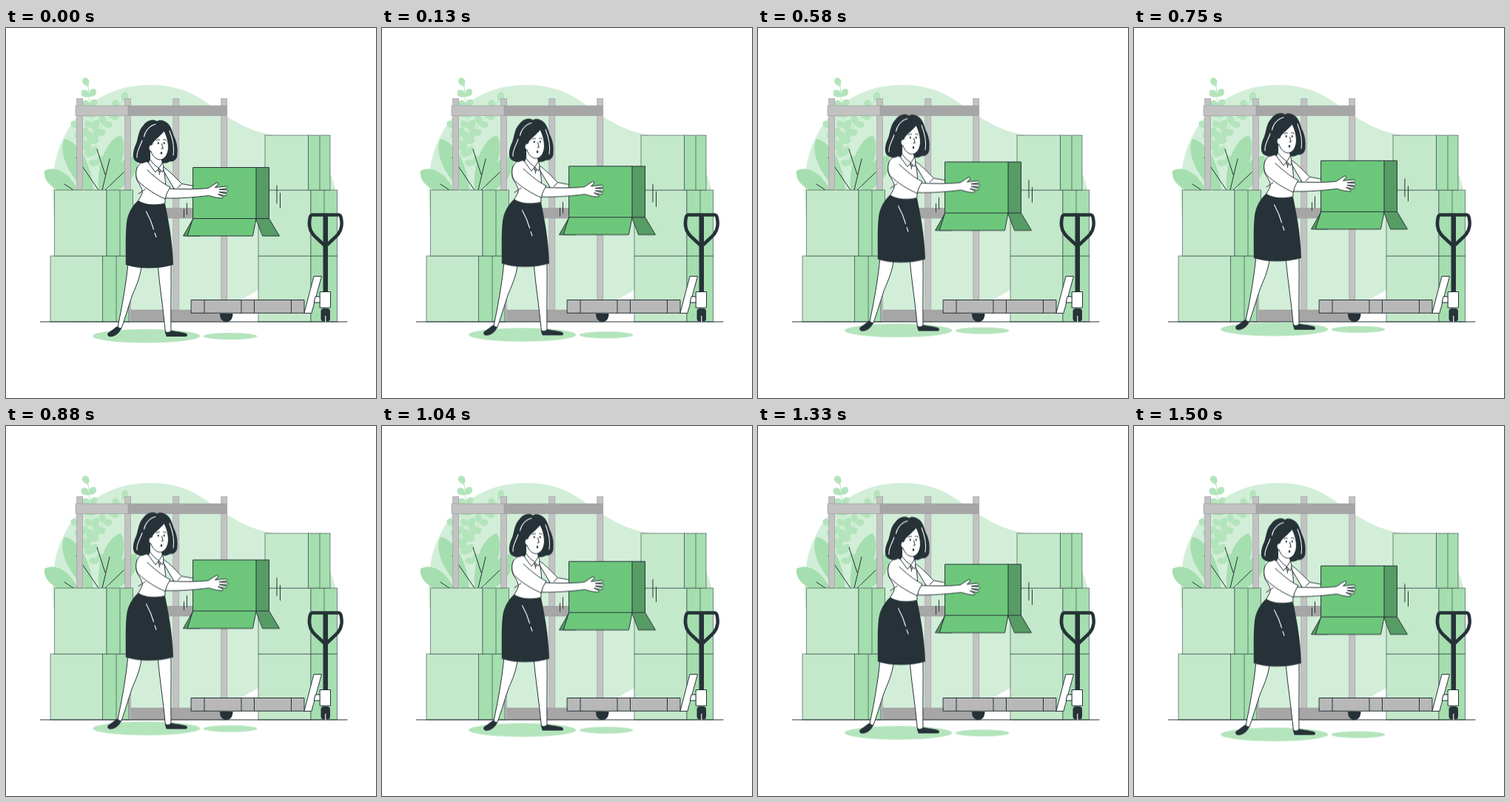
An HTML page for the animation above (1.54 s loop, 500 by 500 pixels).

```html
<!DOCTYPE html>
<html lang="en">
<head>
<meta charset="utf-8">
<title>Floating box</title>
<style>
html, body { margin: 0; height: 100%; overflow: hidden; background: #fff; }
svg { display: block; width: 100vw; height: 100vh; }
.ink { fill: #263238; }
.line { fill: none; stroke: #263238; stroke-width: 1; stroke-linecap: round; stroke-linejoin: round; }
.skin { fill: #fff; stroke: #263238; stroke-width: 1; stroke-linejoin: round; stroke-linecap: round; }
.shine { fill: none; stroke: #fff; stroke-width: 1.1; stroke-linecap: round; }
.shade { fill: #b4e4bc; }
.crate { stroke: #263238; stroke-opacity: .55; stroke-width: 1; }
.metal { stroke: #999; stroke-width: .6; }
</style>
</head>
<body>
<svg viewBox="0 0 500 500">
  <path fill="#d2eed8" d="M195 77C140 77 98 105 78 148C66 172 61 200 64 238C68 320 100 390 165 397C230 400 290 385 341 354C400 330 450 290 446 222C438 180 410 150 365 145C340 142 325 135 302 122C270 102 250 77 195 77Z"/>
  <g id="plant"></g>
  <g id="shelf"></g>
  <g id="crates"></g>
  <path class="line" d="M46.500 397H461"/>

  <g id="jack">
    <path class="ink" d="M289 386H306.500C306.500 393 303 397.300 297.700 397.300S289 393 289 386Z"/>
    <path class="skin" d="M403 385L416 335.500H426.500L413 385Z"/>
    <path class="skin" d="M418.500 363H425V371H416.500Z"/>
    <path class="ink" d="M428.500 253H435V358H428.500Z"/>
    <path fill="none" stroke="#263238" stroke-width="4.500" stroke-linejoin="round" d="M413 252.600H450.600C453 253 454 262 453.500 267C452.500 276 447 281 442.500 285L431.800 295L421 285C416.500 281 411 276 410 267C409.500 262 410.500 253 413 252.600Z"/>
    <rect class="ink" x="425.500" y="379" width="12.500" height="17.500" rx="4"/>
    <path class="shine" d="M431.800 389V397"/>
    <rect class="skin" x="424.500" y="356.500" width="14" height="21.500"/>
    <path class="line" style="fill:#b8b8b8" d="M250.500 367.500H403V385.200H250.500ZM268 367.500V385.200M318 367.500V385.200M335.500 367.500V385.200M385.500 367.500V385.200"/>
  </g>

  <g id="float">
    <ellipse class="shade" cx="189.700" cy="416.200" rx="72.500" ry="9.200"/>
    <ellipse class="shade" cx="303" cy="416.500" rx="36.300" ry="4.600"/>
    <path class="line" d="M240.500 245V256M244.500 237V252M366 213V237M370.500 223V243"/>

    <path class="skin" d="M165 318C162 348 157 376 151 404L155.500 407C160 395 165 378 170 363C174 352 181 340 183.500 320Z"/>
    <path class="skin" d="M205 318C207 345 212 375 215.500 412L223 411C222.500 380 223.500 350 223 318Z"/>
    <path class="ink" d="M150.500 403C152 406 154.500 405.500 156 405.500C154 412 147 417.500 141 417.300C137 417 136 413.500 138.500 411.500C143 408.500 147 405 150.500 403Z"/>
    <path class="ink" d="M215.500 409.500C218 412 221 411 223.500 408.800C230 410.500 238 410.500 243.500 412.800C246 414.500 245.500 416.500 243 417H217C215.500 415 215.200 412 215.500 409.500Z"/>

    <path class="skin" d="M209 186C217 189 226 199 237.500 210.500L254 213.500V218H228Z"/>
    <path class="line" d="M237.500 210.500L232 216"/>
    <path class="skin" d="M194 177.500C186 180 179.500 183 177 189C174.500 197 175.500 205 179 209C182 214 185 219 184 223C182.500 228 179.500 231 178 235C190 240 203 240 215 237C214.500 226 217 212 214 196C213 190 211 186 210 182Z"/>
    <path class="ink" d="M178.500 233C190 239.500 203 240 215 237.200C219 258 225 285 226 320C206 326 180 326 161.800 320C162 300 161 280 163 263C164.500 250 171 240 178.500 233Z"/>
    <path class="shine" d="M189.500 248C194 256 197 263 199.500 272M201 277L203 282.500"/>

    <path class="ink" d="M204 126C199 122 190 125 186 131C179 138 179 147 176 156C172 164 170 174 174 179C178 183 185 184 189 181C195 184 200 180 204 178C211 184 217 183.500 221 180.500C227 181 232 177 231.500 170C232.500 160 230 152 226.500 145C224 137 222 131 217 127.500C212 124 207 123.500 204 126Z"/>
    <path class="skin" d="M194.500 165V180C199 187 205 192 208.500 195L211.500 184L210 174Z"/>
    <path class="skin" d="M196 167C191 164 193 157 197 158C199 151 207 148 213.500 139C218 146 220 157 219.300 164C218.500 171 214.500 177.500 208.500 178C203 178 198 173 196 167Z"/>
    <path class="shine" d="M202 130C194 132 188 139 186.500 147M184 152C181 161 176 167 177 175M221 139C225 149 228 160 226 172"/>
    <g class="ink">
      <ellipse cx="205.800" cy="155.500" rx="1" ry="1.500"/>
      <ellipse cx="213.700" cy="155.500" rx="1" ry="1.500"/>
      <ellipse cx="210" cy="169" rx="1.300" ry="1.800"/>
    </g>
    <path class="line" d="M203 152Q205 150 207.500 151M212.500 150.800Q214.500 149.800 216.500 151.800M210.500 156.500L212.300 163H210"/>
    <path class="skin" d="M194.500 177.500L192.500 182C196 187 199 191 202 195L206.500 189.500C201.500 186 197.500 182 194.500 177.500ZM211.500 182L206.500 189.500L211.500 195C213.500 190 213 186 211.500 182Z"/>
    <path class="line" d="M206.500 190L207.500 198M179 224L188 218"/>

    <g id="box" class="line"></g>

    <path class="skin" d="M217 217C237 218 255 218.300 273 216.500C277 214.500 281 211 285 209C287 209 287.500 210.500 286 212L282.500 215.500L297.500 214C299.500 214.500 299 216.500 297 217L288 218.300L298.500 219C300.500 219.800 300 222 298 222.100L288 221.500L297.500 224.300C299 225.500 298 227 296.500 226.700L286.500 224.500L293 228C293.500 229.500 292.500 230.300 291 230C284 229.500 279 228 274.500 226.500C256 228.500 238 230.500 216 230Z"/>
    <path class="skin" d="M191 192C200 200 211 210 222 215C219 220 216 225 215.500 231C203 226 189 217 180 208.500C175.500 204 174.500 196 177 189"/>
  </g>
</svg>
<script>
const $ = id => document.getElementById(id);
const put = (id, markup) => $(id).insertAdjacentHTML("beforeend", markup);

function rect(cls, fill, l, t, r, b) {
  return `<rect class="${cls}" fill="${fill}" x="${l}" y="${t}" width="${r - l}" height="${b - t}"/>`;
}

// Leaf from base to tip; w sets its bulge.
function leaf(x, y, tx, ty, w, fill) {
  const len = Math.hypot(tx - x, ty - y);
  const nx = -(ty - y) / len * w, ny = (tx - x) / len * w;
  const at = (k, s) => `${x + (tx - x) * k + nx * s} ${y + (ty - y) * k + ny * s}`;
  return `<path fill="${fill}" d="M${x} ${y}C${at(.35, 1.2)} ${at(.85, 1.3)} ${tx} ${ty}C${at(.85, -1.3)} ${at(.35, -1.2)} ${x} ${y}Z"/>`;
}

// Stem with paired leaflets and one at the top.
function sprig(x, y, tx, ty, gap, size) {
  const fill = "#b4e4bc", len = Math.hypot(tx - x, ty - y);
  const a = Math.atan2(ty - y, tx - x);
  const leaflet = (px, py, dir) =>
    leaf(px, py, px + Math.cos(dir) * size, py + Math.sin(dir) * size, size * .38, fill);
  let out = `<path d="M${x} ${y}L${tx} ${ty}" stroke="${fill}" fill="none"/>` + leaflet(tx, ty, a - .35);
  for (let d = gap; d < len; d += gap) {
    const px = tx + (x - tx) * d / len, py = ty + (y - ty) * d / len;
    out += leaflet(px, py, a - .8) + leaflet(px, py, a + .8);
  }
  return out;
}

put("plant",
  sprig(119, 152, 111, 79, 14, 13) +
  sprig(102, 165, 158, 99, 14, 13) +
  sprig(128, 190, 98, 135, 14, 13) +
  [[98, 223, 52, 193, 13], [118, 228, 79, 150, 14], [126, 226, 155, 145, 14], [138, 226, 176, 173, 13]]
    .map(l => leaf(...l, "#a5deaf")).join("") +
  `<path class="line" d="M130 219L140 177M134 198L123 164M125 219L95 175M134 219L159 195M91 219L79 211"/>`);

const post = x => rect("metal", "#c2c2c2", x, 95.5, x + 8, 397);
const beam = (t, b) => rect("metal", "#a6a6a6", 165, t, 298, b);
put("shelf",
  post(225.8) + beam(243.5, 257) + beam(381, 397) +
  [95.7, 160.7, 290.8].map(post).join("") +
  beam(105, 118.5) + rect("metal", "#c2c2c2", 94, 105, 165, 118.5));

// left, top, side edge, seam, right, bottom
put("crates", [
  [60, 308, 130.5, 149, 166, 397],
  [65.5, 219, 136, 154, 171.5, 308],
  [341, 308, 412, 430, 447.5, 397],
  [341, 219, 412, 430, 447.5, 308],
  [350, 145, 408.5, 424, 438, 219]
].map(([l, t, e, s, r, b]) =>
  rect("crate", "#c3e9ca", l, t, e, b) +
  rect("crate", "#a5deaf", e, t, r, b) +
  `<path class="crate" d="M${s} ${t}V${b}"/>`).join(""));

const face = (fill, d) => `<path fill="${fill}" d="${d}"/>`;
const front = "#6dc77b", side = "#569c64";
put("box",
  face(side, "M253 257.500L239.500 281H262L257 257.500Z") +
  face(front, "M253 257.500H338L333.500 281H245.500Z") +
  face(side, "M338 257.500H355.500L369.500 281H347Z") +
  face(side, "M338 188.500H355.500V257.500H338Z") +
  face(front, "M253 188.500H338V257.500H253Z"));

const loop = 1540;
const steps = [[0, 0], [730, -9.48], [1500, .52], [loop, 0]];
$("float").animate(
  steps.map(([t, y]) => ({ offset: t / loop, transform: `translateY(${y}px)` })),
  { duration: loop, iterations: Infinity });
</script>
</body>
</html>
```
